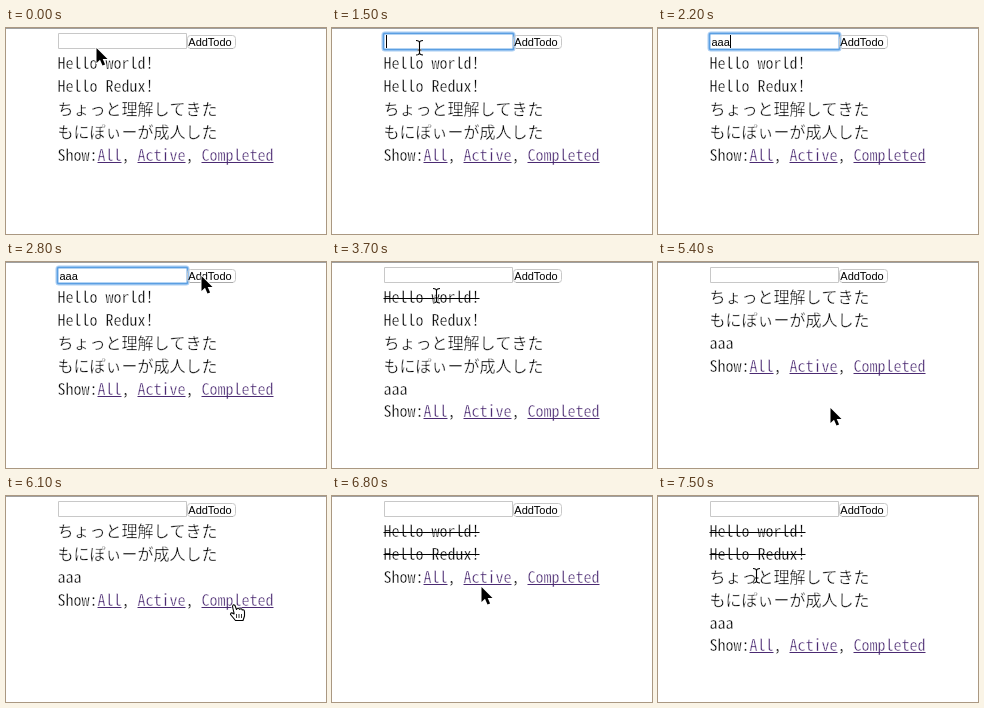
An HTML page with a canvas that plays this animation: 320x206 px, repeating every 7600 ms.

```html
<!DOCTYPE html>
<html lang="ja">
<meta charset="utf-8">
<style>
  html, body { margin: 0; width: 100%; height: 100%; overflow: hidden; background: #fff }
  canvas { display: block }
</style>
<canvas width="320" height="206"></canvas>
<script>
const ctx = document.querySelector('canvas').getContext('2d');
const LOOP = 7600, STEP = 100, LEFT = 51.5, CHAR = 8, ROW = 22.8, FIRST = 41.4;
const MONO = '16px "Noto Sans Mono CJK JP", "Noto Sans CJK JP", "Noto Sans Mono", monospace';
const UI = '11px "Liberation Sans", Arial, sans-serif';
const LINK = '#4b2a72';

// text, time it appears, time it is completed
const todos = [
  ['Hello world!', 0, 3600],
  ['Hello Redux!', 0, 4200],
  ['ちょっと理解してきた', 0, LOOP],
  ['もにぽぃーが成人した', 0, LOOP],
  ['aaa', 3000, LOOP],
];
const links = [[5, 'All'], [10, 'Active'], [18, 'Completed']];
const typed = [1800, 1900, 2100];
const focusFrom = 1500, focusTo = 2900;

// time, x, y, pointer shape from here on
const track = [
  [0, 90, 20, 'arrow'], [100, 89, 20, 'beam'], [300, 87, 20, 'beam'],
  [900, 87, 20, 'beam'], [1000, 84, 23, 'beam'], [1100, 87, 20, 'beam'],
  [2200, 87, 20, 'beam'], [2600, 186, 15, 'arrow'], [2700, 195, 14, 'arrow'],
  [3000, 195, 14, 'arrow'], [3200, 138, 28, 'beam'], [3400, 104, 34, 'beam'],
  [3700, 104, 34, 'beam'], [4100, 104, 63, 'beam'], [4300, 104, 63, 'beam'],
  [4600, 150, 146, 'hand'], [4700, 160, 154, 'hand'], [5000, 160, 154, 'hand'],
  [5100, 160, 154, 'arrow'], [5300, 160, 154, 'arrow'], [5700, 208, 122, 'arrow'],
  [5900, 224, 110, 'hand'], [6100, 229, 108, 'hand'], [6300, 229, 108, 'hand'],
  [6400, 229, 108, 'arrow'], [6600, 220, 106, 'arrow'], [6900, 114, 84, 'hand'],
  [7000, 100, 82, 'hand'], [7100, 98, 80, 'hand'], [7300, 98, 80, 'beam'],
];

const shapes = {
  arrow: new Path2D('M0 0V15L3.5 11.8L6 17.5L8.6 16.4L6.2 10.9H11Z'),
  beam: new Path2D('M-3.5-7.5Q0-7.5 0-5Q0-7.5 3.5-7.5M0-5V5M-3.5 7Q0 7 0 4.5Q0 7 3.5 7M-2 2H2'),
  hand: new Path2D('M-1.5 9L-3 2.5Q-2.5-.5-.5 1.5L1 5.5Q2.5 3 4 5.3Q6 3.8 6.8 6Q9 5.2 9 8V12L7.5 16.5H0L-5 10.5Q-5 7.5-1.5 10Z'),
};

function write(text, x, y, font, color) {
  ctx.font = font;
  ctx.fillStyle = color;
  ctx.fillText(text, x, y);
  return ctx.measureText(text).width;
}

// a fine white edge gives the list text its light weight
function writeLight(text, x, y, color) {
  const width = write(text, x, y, MONO, color);
  ctx.strokeStyle = '#fff';
  ctx.lineWidth = .4;
  ctx.strokeText(text, x, y);
  return width;
}

function bar(x, y, w, h, color) {
  ctx.fillStyle = color;
  ctx.fillRect(x, y, w, h);
}

function box(x, y, w, h, radius, color, width = 1) {
  ctx.beginPath();
  ctx.roundRect(x, y, w, h, radius);
  ctx.strokeStyle = color;
  ctx.lineWidth = width;
  ctx.stroke();
}

function drawForm(t) {
  const focused = t >= focusFrom && t < focusTo;
  if (focused) {
    box(51, 5, 131, 17, 2, '#a9cdf2', 3);
    box(51.5, 5.5, 130, 16, 1, '#5b9fe2', 1.5);
  } else {
    box(52.5, 5.5, 128, 15, 0, '#c8c8c8');
  }
  const count = t < 3000 ? typed.filter(at => t >= at).length : 0;
  const width = write('a'.repeat(count), 53.5, 17.5, UI, '#000');
  const lastKey = typed[count - 1] || focusFrom;
  if (focused && (t - lastKey) % 1000 < 500) bar(Math.round(54 + width), 7, 1, 13, '#000');

  box(181.5, 7.5, 48, 13, 3, '#c8c8c8');
  bar(184, 20, 43, 1, '#aaa');
  write('AddTodo', 182.3, 18, UI, '#000');
}

function drawList(t) {
  const filter = t < 5100 || t >= 7300 ? 'all' : t < 6400 ? 'active' : 'completed';
  let y = FIRST;
  for (const [text, added, completed] of todos) {
    const done = t >= completed;
    if (t < added || filter === 'active' && done || filter === 'completed' && !done) continue;
    const width = writeLight(text, LEFT, Math.round(y), '#000');
    if (done) bar(LEFT, Math.round(y - 5.8), width, 1, '#000');
    y += ROW;
  }
  y = Math.round(y);
  writeLight('Show:', LEFT, y, '#000');
  for (const [column, label] of links) {
    const x = LEFT + column * CHAR;
    const width = writeLight(label, x, y, LINK);
    bar(x, y + 1, width, 1, LINK);
    if (label !== 'Completed') writeLight(',', x + width, y, '#000');
  }
}

function drawPointer(t) {
  if (t >= typed[0] && t < 2300) return; // hidden while typing
  const i = track.findLastIndex(key => key[0] <= t);
  const [t0, x0, y0, kind] = track[i];
  const [t1, x1, y1] = track[i + 1] || [LOOP, x0, y0];
  const k = (t - t0) / (t1 - t0);
  ctx.save();
  ctx.translate(Math.round(x0 + (x1 - x0) * k) + .5, Math.round(y0 + (y1 - y0) * k));
  const shape = shapes[kind];
  ctx.lineJoin = 'round';
  ctx.strokeStyle = '#fff';
  ctx.lineWidth = kind === 'hand' ? 2.5 : 2;
  ctx.stroke(shape);
  ctx.strokeStyle = '#000';
  ctx.lineWidth = 1.1;
  if (kind === 'arrow') {
    ctx.fillStyle = '#000';
    ctx.fill(shape);
  } else {
    ctx.fillStyle = '#fff';
    if (kind === 'hand') ctx.fill(shape);
    ctx.stroke(shape);
  }
  if (kind === 'hand') for (const x of [1, 3.5, 6]) bar(x - .5, 10, 1, 4, '#333');
  ctx.restore();
}

function draw(now) {
  const t = Math.floor(now % LOOP / STEP) * STEP;
  bar(0, 0, 320, 206, '#fff');
  bar(0, 0, 320, 1, '#a0a0a0');
  drawForm(t);
  drawList(t);
  drawPointer(t);
  requestAnimationFrame(() => draw(performance.now() - start));
}

const start = performance.now();
draw(0);
</script>
</html>
```
